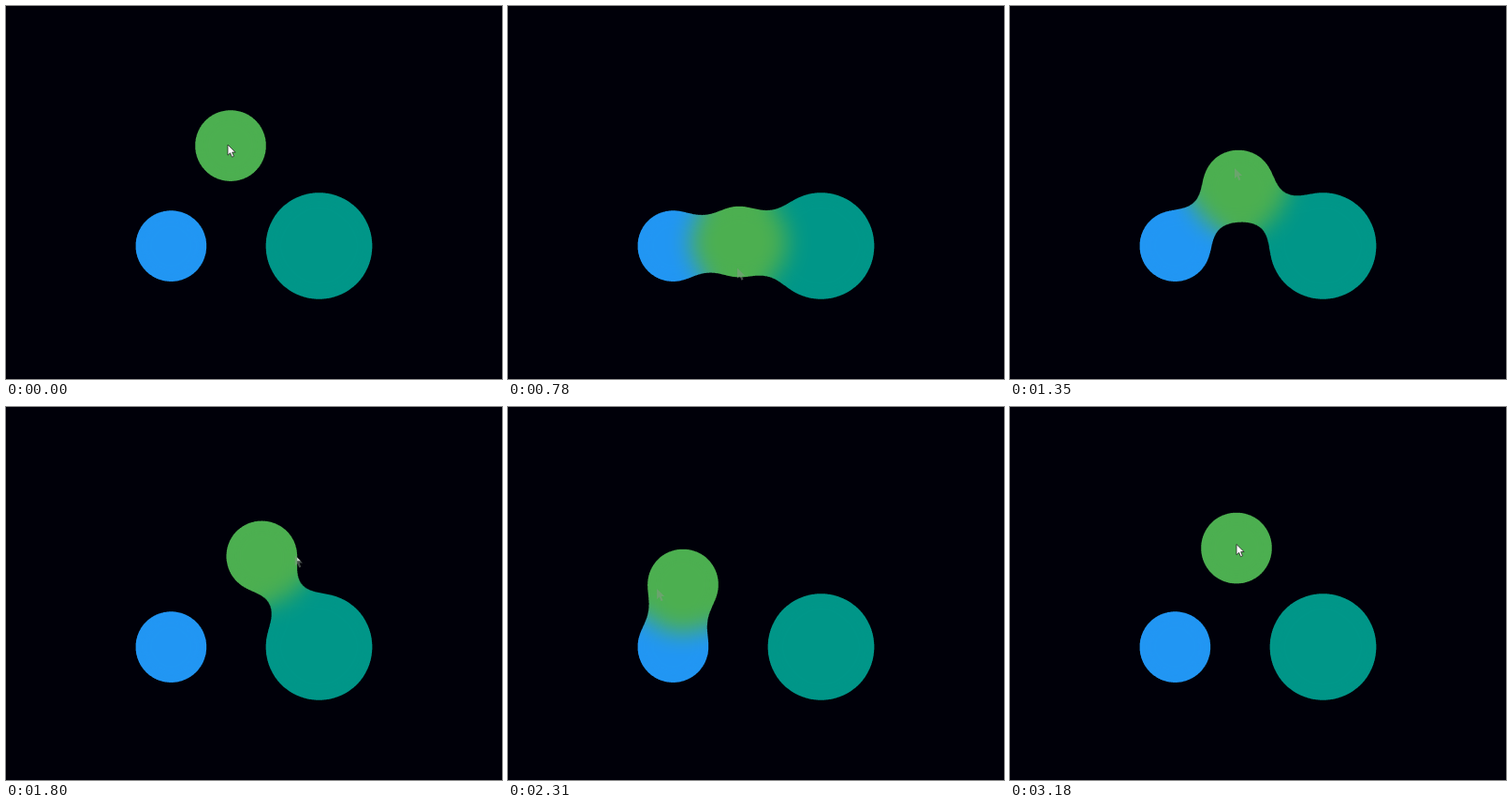
These frames come from a looping animation (530 px wide and 398 px high, 3330 ms). An HTML page:

```html
<!DOCTYPE html>
<html lang="en">
<head>
<meta charset="utf-8">
<title>Gooey circles</title>
<style>
  html, body { margin: 0; width: 100%; height: 100%; overflow: hidden; background: #000009; }
  svg { display: block; width: 530px; height: 398px; }
</style>
</head>
<body>
<svg viewBox="0 0 530 398">
  <defs>
    <!-- Blur the union of the discs, then cut it at 85% alpha -->
    <filter id="goo" filterUnits="userSpaceOnUse" x="0" y="0" width="530" height="398"
            color-interpolation-filters="sRGB">
      <feGaussianBlur stdDeviation="12.5"/>
      <feColorMatrix values="1 0 0 0 0  0 1 0 0 0  0 0 1 0 0  0 0 0 50 -42"/>
    </filter>
    <path id="arrow" d="M0 0V11.2L2.6 8.8 4.5 13.2 6.5 12.3 4.7 8.1H8.2Z"/>
  </defs>
  <path id="tip" d="M0 0V6H6Z" fill="#fff"/>
  <g filter="url(#goo)">
    <circle cx="176.4" cy="256.1" r="51.6" fill="#2196f3"/>
    <circle cx="334.5" cy="256" r="70.2" fill="#009688"/>
    <circle id="ball" r="51.6" fill="#4caf50"/>
  </g>
  <use id="cursor" href="#arrow" stroke-width="0.8"/>
</svg>
<script>
  const LOOP = 3330, STEP = 30, REST = 3000, LAST = 3180, LEAD = 85;

  // Turning points of the drag: time, x, y
  const turns = [
    [0, 240, 149], [390, 246, 254], [600, 245, 179], [780, 247, 251.5],
    [990, 247, 302], [1350, 244, 191.5], [1620, 241, 156], [1800, 273.3, 159.3],
    [2030, 352, 166], [2310, 187, 189.5], [2390, 159, 195], [2550, 226, 287],
    [2820, 250.3, 169.5], [REST, 242, 150.5]
  ];

  const slope = (i, c) => {
    const a = turns[i - 1], b = turns[i + 1];
    return a && b ? (b[c] - a[c]) / (b[0] - a[0]) : 0;
  };

  // Cubic Hermite through the turning points
  function place(t) {
    t = Math.min(t, REST);
    const i = turns.findIndex((p, n) => n && t <= p[0]) - 1;
    const a = turns[i], b = turns[i + 1], d = b[0] - a[0], u = (t - a[0]) / d;
    return [1, 2].map(c =>
      a[c] + (b[c] - a[c]) * u * u * (3 - 2 * u) +
      d * u * (1 - u) * (slope(i, c) * (1 - u) - slope(i + 1, c) * u));
  }

  const [ball, cursor, tip] = ["ball", "cursor", "tip"].map(id => document.getElementById(id));

  function set(el, attrs) {
    for (const k in attrs) el.setAttribute(k, attrs[k]);
  }

  function draw(now) {
    const t = Math.min(Math.floor((now % LOOP) / STEP) * STEP, LAST);
    const resting = t < STEP || t >= REST;
    const [x, y] = place(t);
    const [px, py] = place(resting ? t : t + LEAD);
    const drift = 3 * t / LAST; // the grip slips a little while dragging
    const at = `translate(${px - 3 + drift} ${py - 1 - drift})`;
    set(ball, { cx: x, cy: y });
    set(tip, { transform: at, opacity: resting ? 0 : 1 });
    set(cursor, {
      transform: at,
      fill: resting ? "#fff" : "#8a9a8a",
      stroke: resting ? "#222" : "none",
      opacity: resting ? 1 : 0.5
    });
  }

  const start = performance.now();
  function tick() {
    draw(performance.now() - start);
    requestAnimationFrame(tick);
  }
  tick();
</script>
</body>
</html>
```
